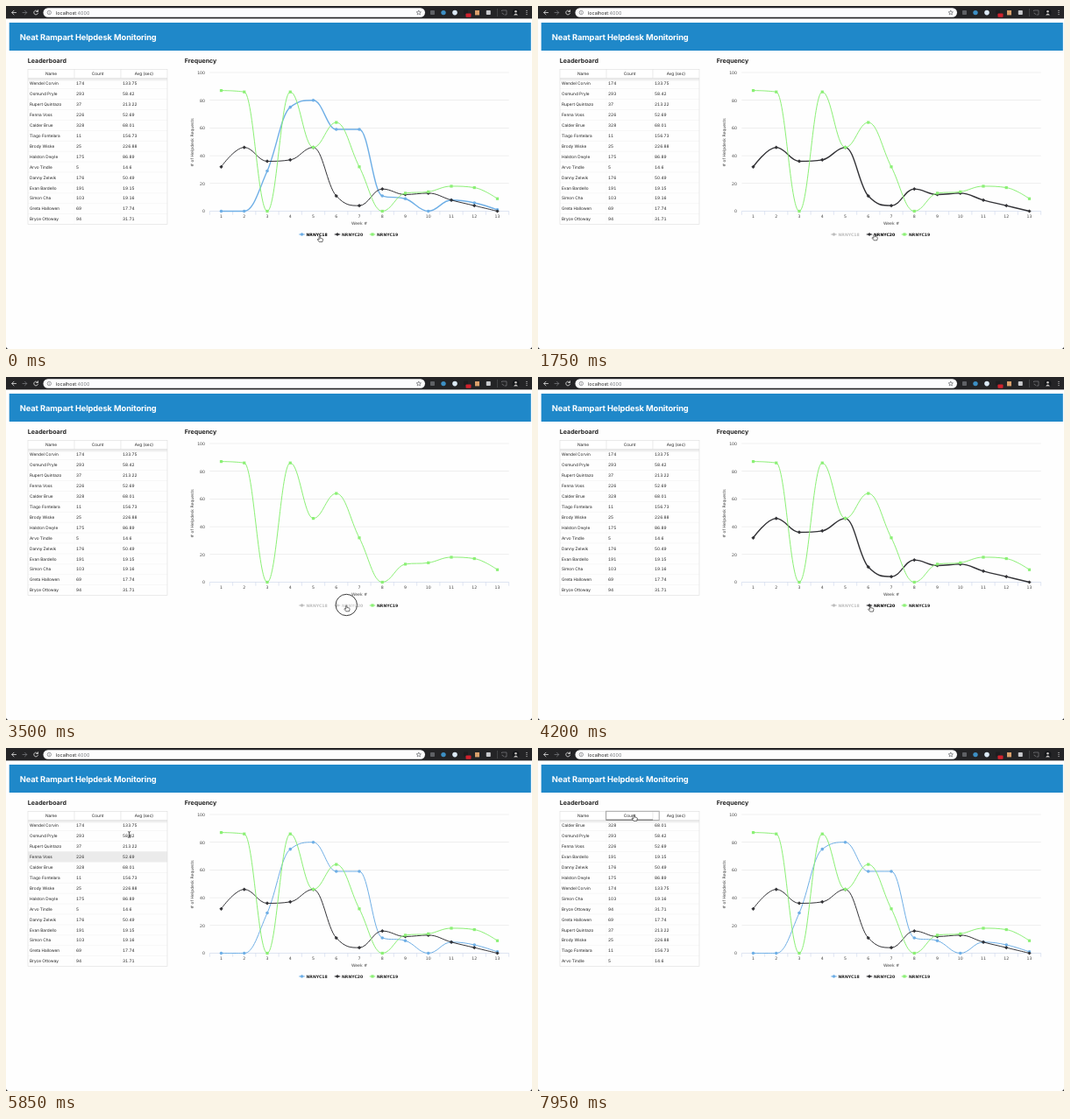
Write an HTML page that moves like this. It is 600 by 392 pixels and loops after 8000 ms.

```html
<!DOCTYPE html>
<html lang="en">
<head>
<meta charset="utf-8">
<title>Helpdesk Monitoring</title>
<style>
  html, body { margin: 0; width: 100%; height: 100%; overflow: hidden; background: #fff; }
  svg { display: block; width: 100%; height: 100%; }
  text { font-family: Inter, Roboto, sans-serif; fill: #222; text-rendering: geometricPrecision; }
  .chart text { font: 4.65px "DejaVu Sans", sans-serif; fill: #444; }
  .chart .key { font-weight: bold; font-size: 4.6px; fill: #222; }
  .cell { font-size: 4.75px; font-variant-numeric: tabular-nums; }
  .h2 { font-size: 7.05px; font-weight: 650; }
</style>
</head>
<body>
<svg id="stage" viewBox="0 0 600 392"></svg>
<script>
const NS = 'http://www.w3.org/2000/svg';
const stage = document.getElementById('stage');
const LOOP = 8000;

function el(parent, tag, attrs = {}, text) {
  const node = document.createElementNS(NS, tag);
  for (const k in attrs) node.setAttribute(k, attrs[k]);
  if (text !== undefined) node.textContent = text;
  parent.appendChild(node);
  return node;
}
const rect = (p, x, y, width, height, fill, more) => el(p, 'rect', { x, y, width, height, fill, ...more });
const path = (p, d, stroke, w, more) => el(p, 'path', { d, stroke, 'stroke-width': w, fill: 'none', ...more });
const disc = (p, cx, cy, r, fill, more) => el(p, 'circle', { cx, cy, r, fill, ...more });
const label = (p, x, y, text, more) => el(p, 'text', { x, y, ...more }, text);
const show = (node, on) => node.setAttribute('visibility', on ? 'visible' : 'hidden');

// Browser bar
function drawBrowser() {
  const g = el(stage, 'g');
  rect(g, 0, 0, 600, 14.4, '#242426');
  rect(g, 42.5, 2.2, 435.5, 10.6, '#fdfdfd', { rx: 5.3 });
  const cap = { 'stroke-linecap': 'round', 'stroke-linejoin': 'round' };
  path(g, 'M11.5 7.5H6.8M9 5.2L6.7 7.5L9 9.8', '#e4e4e4', .8, cap);
  path(g, 'M19 7.5H23.7M21.5 5.2L23.8 7.5L21.5 9.8', '#77787b', .8, cap);
  path(g, 'M36.2 6.2A2.4 2.4 0 1 0 36.5 8.2M36.5 4.7V6.5H34.6', '#e4e4e4', .8, cap);
  disc(g, 49.3, 7.5, 2.2, 'none', { stroke: '#5f6165', 'stroke-width': .6 });
  path(g, 'M49.3 7.2V8.7M49.3 6.1V6.5', '#5f6165', .6);
  const url = label(g, 57, 9.5, '', { 'font-size': 5.4 });
  el(url, 'tspan', {}, 'localhost');
  el(url, 'tspan', { fill: '#77797d' }, ':4000');
  let star = '';
  for (let i = 0; i < 10; i++) {
    const a = -Math.PI / 2 + i * Math.PI / 5, r = i % 2 ? 1.2 : 2.8;
    star += (i ? 'L' : 'M') + (470.8 + r * Math.cos(a)).toFixed(2) + ' ' + (7.7 + r * Math.sin(a)).toFixed(2);
  }
  path(g, star + 'Z', '#55575b', .6);
  rect(g, 484, 5, 5, 5, '#5f6165', { rx: .8 });
  disc(g, 499, 7.6, 2.7, '#3d8fc4');
  disc(g, 512, 7.6, 2.8, '#dce9f5');
  rect(g, 522, 4.5, 5, 5, '#1d1d1f');
  rect(g, 524.5, 8.5, 6, 4.3, '#d3202c', { rx: .8 });
  rect(g, 535, 5, 5, 5.4, '#d9a06c');
  rect(g, 547.8, 5, 5, 5, '#c9cacd', { rx: .8 });
  rect(g, 560.2, 3, .5, 9, '#5d5e61');
  path(g, 'M565.5 6V5H571V10H568.5M565.5 8A2 2 0 0 1 567.5 10', '#8b8c8f', .6);
  disc(g, 581.5, 7.5, 4, '#16181b');
  disc(g, 581.5, 6.2, 1.3, '#c9c5c3');
  path(g, 'M579 10.4Q581.5 6.6 584 10.4Z', 'none', 0, { fill: '#c9c5c3' });
  for (let i = 0; i < 3; i++) disc(g, 594, 5.4 + i * 2.1, .6, '#d8d8d8');
}

function drawHeadings() {
  rect(stage, 3.7, 19, 595.1, 32, '#1f88c9');
  label(stage, 15.8, 38.6, 'Neat Rampart Helpdesk Monitoring',
    { 'font-size': 9.3, 'font-weight': 650, 'letter-spacing': '-.012em', style: 'fill:#fff' });
  label(stage, 24.8, 64.8, 'Leaderboard', { class: 'h2' });
  label(stage, 203.8, 64.8, 'Frequency', { class: 'h2' });
}

// Leaderboard
const people = [
  ['Wendel Corvin', 174, '133.75'], ['Osmund Pryle', 293, '58.42'],
  ['Rupert Quintazo', 37, '213.22'], ['Fenna Voss', 226, '52.69'],
  ['Calder Brue', 328, '68.01'], ['Tiago Fontelara', 11, '156.73'],
  ['Brody Wiske', 25, '226.88'], ['Halston Dwyle', 175, '86.89'],
  ['Arvo Tindle', 5, '14.6'], ['Danny Zelwik', 176, '50.49'],
  ['Evan Bardello', 191, '19.15'], ['Simon Cha', 103, '19.16'],
  ['Greta Hallowen', 69, '17.74'], ['Bryce Ottoway', 94, '31.71']
];
const byCount = [...people].sort((a, b) => a[1] - b[1]);
const orders = [people, byCount, [...byCount].reverse()];
const cols = [25, 78, 131, 184];
const TOP = 82.5, ROW = 11.94;
const table = {};

function drawTable() {
  const g = el(stage, 'g');
  const bottom = TOP + ROW * people.length;
  table.hover = rect(g, 25, TOP, 159, ROW, '#ebebeb');
  for (let i = 0; i < 4; i++)
    rect(g, 25, TOP + i * .9, 159, .9, '#000', { opacity: .1 - i * .025 });
  table.cells = people.map((_, i) => {
    const y = TOP + ROW * i;
    if (i) rect(g, 25, y - .2, 159, .5, '#eeeeee');
    return [27, 80, 133].map(x => label(g, x, y + 7.6, '', { class: 'cell' }));
  });
  for (const x of [78, 131]) rect(g, x - .2, TOP, .4, bottom - TOP, '#f6f6f6');
  rect(g, 25, 72.3, 159, 10.2, '#fff');
  rect(g, 25, 72.3, 159, bottom - 72.3, 'none', { stroke: '#dedede', 'stroke-width': .6 });
  path(g, 'M25 82.5H184M78 72.3V82.5M131 72.3V82.5', '#dcdcdc', .6);
  ['Name', 'Count', 'Avg (sec)'].forEach((s, i) =>
    label(g, (cols[i] + cols[i + 1]) / 2, 79.1, s, { class: 'cell', 'text-anchor': 'middle' }));
  // The focus ring also wraps the column's resize handle
  table.ring = rect(g, 77.5, 72.3, 60.7, 10.2, 'none', { stroke: '#a8a8a8', 'stroke-width': 1 });
  table.bar = rect(g, 78, 72.3, 53, 1.25, '#000');
}

// Chart
const X0 = 245.5, DX = 26.25, Y0 = 234.5, DY = 1.585;
const OFF = '#bebebe';
const series = [
  { name: 'NRNYC18', color: '#6fafe6', shape: 'circle', key: 337.5,
    data: [0, 0, 29, 75, 80, 59, 59, 11, 9, 0, 8, 6, 1] },
  { name: 'NRNYC20', color: '#323236', shape: 'diamond', key: 378,
    data: [32, 46, 36, 37, 46, 11, 4, 16, 12, 13, 8, 4, 0] },
  { name: 'NRNYC19', color: '#8bf075', shape: 'square', key: 418,
    data: [87, 86, 0, 86, 46, 64, 32, 0, 13, 14, 18, 17, 9] }
];

function spline(pts) {
  let d = `M${pts[0]}`, out = pts[0];
  for (let i = 1; i < pts.length; i++) {
    const [x, y] = pts[i], [px, py] = pts[i - 1], next = pts[i + 1];
    let left = [x, y], right = [x, y];
    if (next) {
      const [nx, ny] = next;
      const lx = (1.5 * x + px) / 2.5, rx = (1.5 * x + nx) / 2.5;
      const slope = (ny - py) / (nx - px);
      const clamp = (v, a, b) => Math.min(Math.max(v, Math.min(a, b)), Math.max(a, b));
      let ly = clamp(y - slope * (x - lx), py, y);
      let ry = clamp(2 * y - ly, ny, y);
      ly = 2 * y - ry;
      left = [lx, ly];
      right = [rx, ry];
    }
    d += `C${out} ${left} ${x},${y}`;
    out = right;
  }
  return d;
}

function marker(p, shape, x, y, fill) {
  if (shape === 'circle') return disc(p, x, y, 1.8, fill);
  if (shape === 'square') return rect(p, x - 1.6, y - 1.6, 3.2, 3.2, fill);
  return el(p, 'path', { d: `M${x} ${y - 2.1}l2.1 2.1l-2.1 2.1l-2.1 -2.1Z`, fill });
}

function drawChart() {
  const g = el(stage, 'g', { class: 'chart' });
  for (let v = 0; v <= 100; v += 20) {
    const y = Y0 - v * DY;
    if (v) rect(g, 232.4, y - .3, 341.3, .6, '#e4e4e4');
    label(g, 227, y + 1.8, v, { 'text-anchor': 'end' });
  }
  let axis = `M232.4 ${Y0}H573.7`;
  for (let i = 0; i < 14; i++) axis += `M${X0 + DX * (i - .5)} ${Y0}v4.2`;
  path(g, axis, '#ccd6eb', .6);
  for (let i = 0; i < 13; i++)
    label(g, X0 + DX * i, 242.2, i + 1, { 'text-anchor': 'middle' });
  label(g, 403, 249.8, 'Week #', { 'text-anchor': 'middle' });
  label(g, 0, 0, '# of Helpdesk Requests',
    { 'text-anchor': 'middle', transform: 'translate(214 156) rotate(-90)' });
  for (const s of series) {
    const pts = s.data.map((v, i) => [X0 + DX * i, Y0 - DY * v]);
    s.plot = el(g, 'g');
    s.line = path(s.plot, spline(pts), s.color, 1, { 'stroke-linejoin': 'round' });
    for (const [x, y] of pts) marker(s.plot, s.shape, x, y, s.color);
  }
  for (const s of series) {
    s.dash = path(g, `M${s.key - 3.3} 261h6.6`, s.color, 1);
    s.mark = marker(g, s.shape, s.key, 261, s.color);
    s.text = label(g, s.key + 5, 262.7, s.name, { class: 'key' });
  }
}

// Pointer, drawn with its hot spot at 0,0
const pointer = {};
function drawPointer() {
  pointer.ring = disc(stage, 0, 0, 12.2, '#fff', { 'fill-opacity': .25, stroke: '#3c3c3c', 'stroke-width': 1 });
  pointer.g = el(stage, 'g');
  const outline = d => path(pointer.g, d, '#111', .6, { fill: '#fff', 'stroke-linejoin': 'round' });
  pointer.hand = outline('M-.6 1Q0 .2 .6 1V3L1.9 3.2L3.1 3.5Q4 3.8 3.8 4.8L3.2 7.3H-.4L-2.3 4.9Q-2.5 3.9 -1.6 4.1L-.6 4.8Z');
  pointer.arrow = outline('M0 0V7L1.6 5.6L2.7 8L3.8 7.5L2.7 5.2H4.8Z');
  pointer.beam = path(pointer.g, 'M-1.4 -3.4Q0 -3.4 0 -2.4V2.4Q0 3.4 -1.4 3.4M1.4 -3.4Q0 -3.4 0 -2.4M0 2.4Q0 3.4 1.4 3.4M-.7 .9H.7', '#222', .8);
}

// Motion
const smooth = u => u * u * (3 - 2 * u);
const easeOut = u => 1 - (1 - u) ** 3;
const unit = (t, a, b) => Math.min(Math.max((t - a) / (b - a), 0), 1);
const moves = [
  [700, 1600, 383.5, 260.5, smooth], [1760, 2000, 388.3, 260.5, smooth],
  [4020, 4500, 359.5, 261.5, smooth], [5450, 6250, 109.5, 76, easeOut]
];
const clicks = [[50, 200], [2000, 2180], [3490, 3640], [4650, 4800], [6380, 6480], [7690, 7780]];

function hotspot(t) {
  let x = 357.7, y = 262.3;
  for (const [a, b, tx, ty, ease] of moves) {
    const k = ease(unit(t, a, b));
    x += (tx - x) * k;
    y += (ty - y) * k;
  }
  return [x, y];
}

function ringAlpha(t) {
  return clicks.reduce((m, [a, b]) => t < a ? m : Math.max(m, 1 - unit(t, b, b + 90)), 0);
}

const overKey = (s, x, y) => y > 256 && x > s.key - 4 && x < s.key + 31;

function renderChart(t, x, y) {
  const on = [t < 200 || t >= 4800, t < 2180 || t >= 3640, true];
  series.forEach((s, i) => {
    const over = overKey(s, x, y);
    const color = on[i] ? s.color : OFF;
    show(s.plot, on[i]);
    s.line.setAttribute('stroke-width', over ? 1.4 : 1);
    s.dash.setAttribute('stroke', color);
    s.mark.setAttribute('fill', color);
    s.text.style.fill = on[i] ? (over ? '#000' : '#222') : OFF;
  });
}

let order = -1;
function renderTable(t) {
  const now = t < 6480 ? 0 : t < 7780 ? 1 : 2;
  if (now !== order) {
    order = now;
    table.cells.forEach((row, i) => row.forEach((c, j) => { c.textContent = orders[now][i][j]; }));
  }
  // The row highlight trails the pointer
  const [x, y] = hotspot(t - 100);
  const row = Math.floor((y - TOP) / ROW);
  show(table.hover, x > 25 && x < 184 && row >= 0 && row < people.length);
  table.hover.setAttribute('y', TOP + ROW * row);

  show(table.ring, t >= 6380);
  const offset = 1.25 * (easeOut(unit(t, 6480, 6780)) - 2 * easeOut(unit(t, 7780, 8080)));
  const h = Math.abs(offset);
  table.bar.setAttribute('y', offset > 0 ? 72.3 : TOP - h);
  table.bar.setAttribute('height', h);
  table.bar.setAttribute('opacity', .45 * unit(t, 6480, 6780));
}

function renderPointer(t, x, y) {
  const at = `translate(${x.toFixed(2)} ${y.toFixed(2)})`;
  const inTable = x < 184 && y < 250;
  const hand = series.some(s => overKey(s, x, y)) || (inTable && y < TOP);
  show(pointer.hand, hand);
  show(pointer.beam, inTable && !hand);
  show(pointer.arrow, !inTable && !hand);
  pointer.g.setAttribute('transform', at);
  pointer.ring.setAttribute('transform', at);
  pointer.ring.setAttribute('opacity', ringAlpha(t));
}

function render(t) {
  const [x, y] = hotspot(t);
  renderChart(t, x, y);
  renderTable(t);
  renderPointer(t, x, y);
}

rect(stage, 0, 0, 600, 392, '#fefefe');
drawBrowser();
drawHeadings();
drawTable();
drawChart();
drawPointer();
path(stage, 'M0 389.5V392H2.5Q.4 391.6 0 389.5ZM600 389.5V392H597.5Q599.6 391.6 600 389.5Z', 'none', 0, { fill: '#222' });

const start = performance.now();
function tick() {
  render((performance.now() - start) % LOOP);
  requestAnimationFrame(tick);
}
tick();
</script>
</body>
</html>
```
